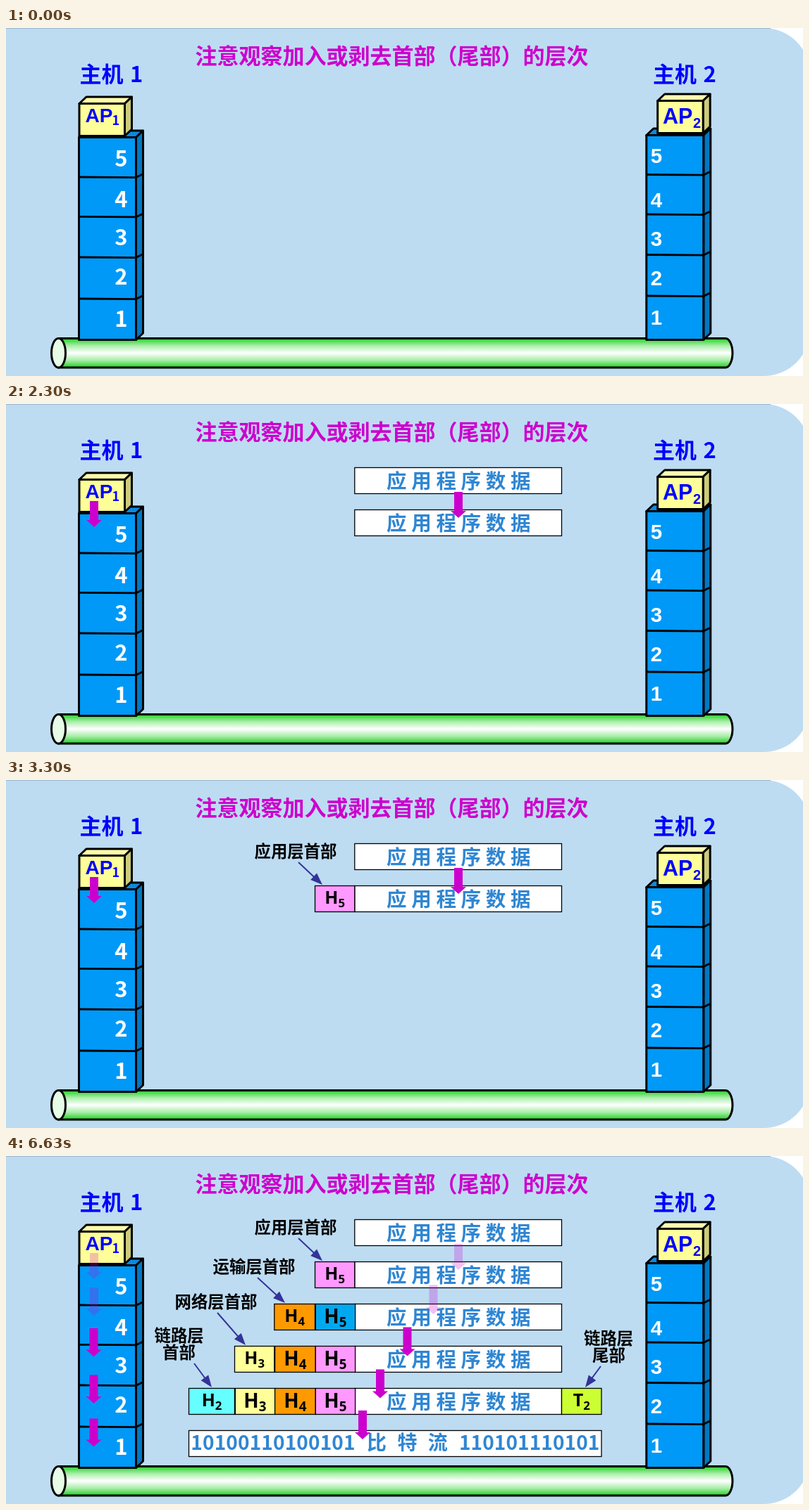
These frames come from a looping animation (1131 px wide and 495 px high, 8000 ms). An HTML page:

```html
<!DOCTYPE html>
<html lang="zh-CN">
<head>
<meta charset="utf-8">
<style>
  html, body { margin: 0; width: 100%; height: 100%; overflow: hidden; background: #fff; }
  svg { display: block; }
  text { font: bold 31px "Noto Sans CJK SC", "Noto Sans CJK", "Noto Sans CJK JP", sans-serif; white-space: pre; }
  .arial { font-family: "Liberation Sans", Arial, sans-serif; }
  .latin { font-family: "Noto Sans", "Open Sans", sans-serif; }
  .mid { text-anchor: middle; }
  .host { word-spacing: 2.5px; }
</style>
</head>
<body>
<svg id="stage" width="1131" height="495" viewBox="0 0 1131 495"></svg>
<script>
const stage = document.getElementById('stage');
const BLUE = '#0000ff', MAGENTA = '#cc00cc', DATA = '#2f86d2';
const PINK = '#ff99ff', ORANGE = '#ff9900', YELLOW = '#ffff99';

const text = (x, y, s, size, fill = '#000', cls = '', spacing = 0) =>
  `<text x="${x}" y="${y}" fill="${fill}" class="${cls}" style="font-size:${size}px;letter-spacing:${spacing}px">${s}</text>`;

const rect = (x, y, w, h, fill, stroke = 1.3) =>
  `<rect x="${x}" y="${y}" width="${w}" height="${h}" fill="${fill}" stroke="#000" stroke-width="${stroke}"/>`;

const group = (id, content, attrs = '') => `<g id="${id}" ${attrs}>${content}</g>`;

// Box with a visible top and right side
function block(x, y, w, h, front, top, side) {
  return `<g stroke="#000" stroke-width="3" stroke-linejoin="round">
    <path d="M${x} ${y}l10-9.5h${w}l-10 9.5z" fill="${top}"/>
    <path d="M${x + w} ${y}l10-9.5v${h}l-10 9.5z" fill="${side}"/>
    ${rect(x, y, w, h, front, 3)}</g>`;
}

function tower(x, y, dividers, numX, baselines, cls, size) {
  const lines = dividers.map(d => `M${x} ${d}l81 .6l10-5`).join('');
  return block(x, y, 81, 443.5 - y, '#0099f7', '#0a8be0', '#0078c4') +
    `<path d="${lines}" fill="none" stroke="#000" stroke-width="2.8"/>` +
    baselines.map((b, i) => text(numX, b, 5 - i, size, '#fff', 'mid ' + cls)).join('');
}

// Block arrow pointing down, tip at (x, bottom)
const arrow = (x, top, bottom) =>
  `<path d="M${x - 6} ${top}h12V${bottom - 10}h5L${x} ${bottom}L${x - 11} ${bottom - 10}h5z" fill="${MAGENTA}"/>`;

function pointer(x1, y1, x2, y2) {
  const angle = Math.atan2(y2 - y1, x2 - x1) * 180 / Math.PI;
  const length = Math.hypot(x2 - x1, y2 - y1);
  return `<g transform="translate(${x2} ${y2}) rotate(${angle})" fill="#333399">
    <path d="M${-length} -1H-14V1H${-length}z"/><path d="M0 0L-17 -6.5V6.5z"/></g>`;
}

const rowY = row => 90.5 + 60 * row;
const dataBar = row => rect(494.8, rowY(row), 293.7, 37, '#fff') +
  text(540, rowY(row) + 29, '应用程序数据', 28.5, DATA, '', 6.7);

const SMALL = 25, BIG = 28;
function header(x, w, row, name, fill, size = SMALL) {
  const big = size === BIG;
  const left = big ? x + 0.8 : x;
  const base = rowY(row) + (big ? 27 : 25);
  const sub = `<tspan dy="5" font-size="${size * 0.67}">${name[1]}</tspan>`;
  return rect(left, rowY(row), w, 37, fill) +
    text(left + w / 2, base, name[0] + sub, size, '#000', 'mid latin');
}
const h5 = (row, fill = PINK, size = BIG) => header(438.5, 56.3, row, 'H5', fill, size);
const h4 = (row, size = BIG) => header(380.8, 57.7, row, 'H4', ORANGE, size);
const h3 = (row, size = BIG) => header(324.5, 56.3, row, 'H3', YELLOW, size);

// Soft-edged downward wipe driven by its gradient's y1 and y2
const wipeMask = id => `<linearGradient id="${id}Edge" x1="0" x2="0">
    <stop stop-color="#fff"/><stop offset="1" stop-color="#fff" stop-opacity="0"/></linearGradient>
  <mask id="${id}" maskContentUnits="objectBoundingBox">
    <rect x="-.1" y="-.1" width="1.2" height="1.2" fill="url(#${id}Edge)"/></mask>`;

const defs = `<defs>
  <linearGradient id="pipe" x1="0" x2="0" y1="0" y2="1">
    <stop stop-color="#1fd01f"/><stop offset=".25" stop-color="#a9eea9"/><stop offset=".5" stop-color="#fff"/>
    <stop offset=".75" stop-color="#a9eea9"/><stop offset="1" stop-color="#1fd01f"/></linearGradient>
  <linearGradient id="peekEdge" gradientUnits="userSpaceOnUse" x1="316" x2="339">
    <stop stop-color="#fff" stop-opacity="0"/><stop offset="1" stop-color="#fff"/></linearGradient>
  <mask id="peek" maskUnits="userSpaceOnUse" x="0" y="0" width="1131" height="495">
    <rect width="1131" height="495" fill="url(#peekEdge)"/></mask>
  ${wipeMask('arrowWipe')}${wipeMask('barWipe')}</defs>`;

const scenery =
  `<rect x="-80" width="1221" height="495" rx="66" fill="#bddcf2"/>
  <path d="M0 .5H1085" stroke="#9db9cf"/>
  <g stroke="#000" stroke-width="3">
    <path d="M74.5 441.5H1021a10 20.7 0 0 1 0 41.4H74.5z" fill="url(#pipe)"/>
    <ellipse cx="74.5" cy="462.2" rx="10" ry="20.7" fill="#e6fce6"/></g>` +
  tower(103.5, 155.5, [212, 268.3, 326, 385], 163.5, [197, 255, 309, 365, 425], '', 31) +
  tower(908.8, 152.5, [208.5, 265, 322.5, 381], 923, [192, 255, 310, 366, 422], 'arial', 29.5) +
  block(104, 107.5, 64.5, 46, YELLOW, '#ffffad', '#cccc7a') +
  block(924.7, 103.5, 64.5, 46, YELLOW, '#ffffad', '#cccc7a') +
  text(112.5, 134, 'AP', 28, BLUE, 'arial') + text(150.5, 138, '1', 18, BLUE) +
  text(932, 136, 'AP', 30.5, BLUE, 'arial') + text(975, 142, '2', 20, BLUE, 'arial') +
  text(268.5, 50.5, '注意观察加入或剥去首部（尾部）的层次', 31, MAGENTA) +
  text(104.5, 76.5, '主机 1', 31, BLUE, 'host') + text(918, 76.5, '主机 2', 31, BLUE, 'host');

const label = (x, y, s) => text(x, y, s, 23.4);

const lowerLayers =
  [2, 3, 4].map(dataBar).join('') +
  h4(2, SMALL) + h5(2, '#00a8f0') +
  h3(3, SMALL) + h4(3) + h5(3) +
  header(259.5, 65, 4, 'H2', '#66ffff') + h3(4) + h4(4) + h5(4) +
  header(788.5, 56.5, 4, 'T2', '#ccff33') +
  rect(259.5, rowY(5), 585.5, 37, '#fff') +
  text(262.3, 418, '10100110100101', 28, DATA, '', 0.15) +
  text(512, 418, '比特流', 28, DATA, '', 15.4) +
  text(643, 418, '110101110101', 28, DATA, '', 0.1) +
  label(293.5, 166, '运输层首部') + label(239.5, 216, '网络层首部') +
  label(210.5, 264, '链路层') + label(222, 288, '首部') +
  label(820, 268, '链路层') + label(832, 292, '尾部') +
  pointer(357, 173, 396, 209) + pointer(300, 223, 340, 269) +
  pointer(267, 295, 292, 329) + pointer(844, 299, 822, 329) +
  group('secondArrows', arrow(125, 187, 227) + arrow(606.5, 183.5, 225)) +
  arrow(124.5, 245, 285.5) + arrow(124.5, 311.5, 352) + arrow(124.5, 373.5, 413.5) +
  arrow(569.5, 243.5, 284.5) + arrow(531, 303.5, 344.5) + arrow(506, 362, 403);

const wiped = 'mask="url(#arrowWipe)"';
stage.innerHTML = defs + scenery +
  group('firstBar', dataBar(0)) +
  group('secondBar', dataBar(1), 'mask="url(#barWipe)"') +
  group('peekFrame', group('headerGroup',
    h5(1, PINK, SMALL) + label(352.5, 110, '应用层首部') + pointer(415, 117, 449, 149)), 'mask="url(#peek)"') +
  group('lower', lowerLayers) +
  group('firstArrows', group('a1', arrow(125, 138, 175), wiped) + group('a2', arrow(642, 125, 162), wiped));

const $ = id => document.getElementById(id);
const show = (id, on) => $(id).setAttribute('visibility', on ? 'visible' : 'hidden');

// Progress 0..1 in equal held steps, the first one taken at start
const steps = (t, start, interval, count) =>
  Math.max(0, Math.min(count, Math.floor((t - start) / interval) + 1)) / count;

function wipe(id, p) {
  const soft = 0.3, edge = p * (1 + soft) - soft + (p === 1 ? 0.2 : 0);
  $(id + 'Edge').setAttribute('y1', edge);
  $(id + 'Edge').setAttribute('y2', edge + soft);
}

function draw() {
  const t = performance.now() % 8000;
  show('firstBar', t >= 1020);
  wipe('arrowWipe', steps(t, 1270, 75, 7));
  wipe('barWipe', steps(t, 1980, 80, 5));
  const slide = steps(t, 2740, 80, 8);
  show('peekFrame', slide > 0);
  $('headerGroup').setAttribute('transform', `translate(${-157 * (1 - slide)} 0)`);
  $('firstArrows').setAttribute('opacity', t < 3830 ? 1 : 0.25);
  $('lower').setAttribute('display', t < 4070 ? 'none' : 'inline');
  $('secondArrows').setAttribute('opacity', t < 6630 ? 1 : 0.25);
  requestAnimationFrame(draw);
}
draw();
</script>
</body>
</html>
```
